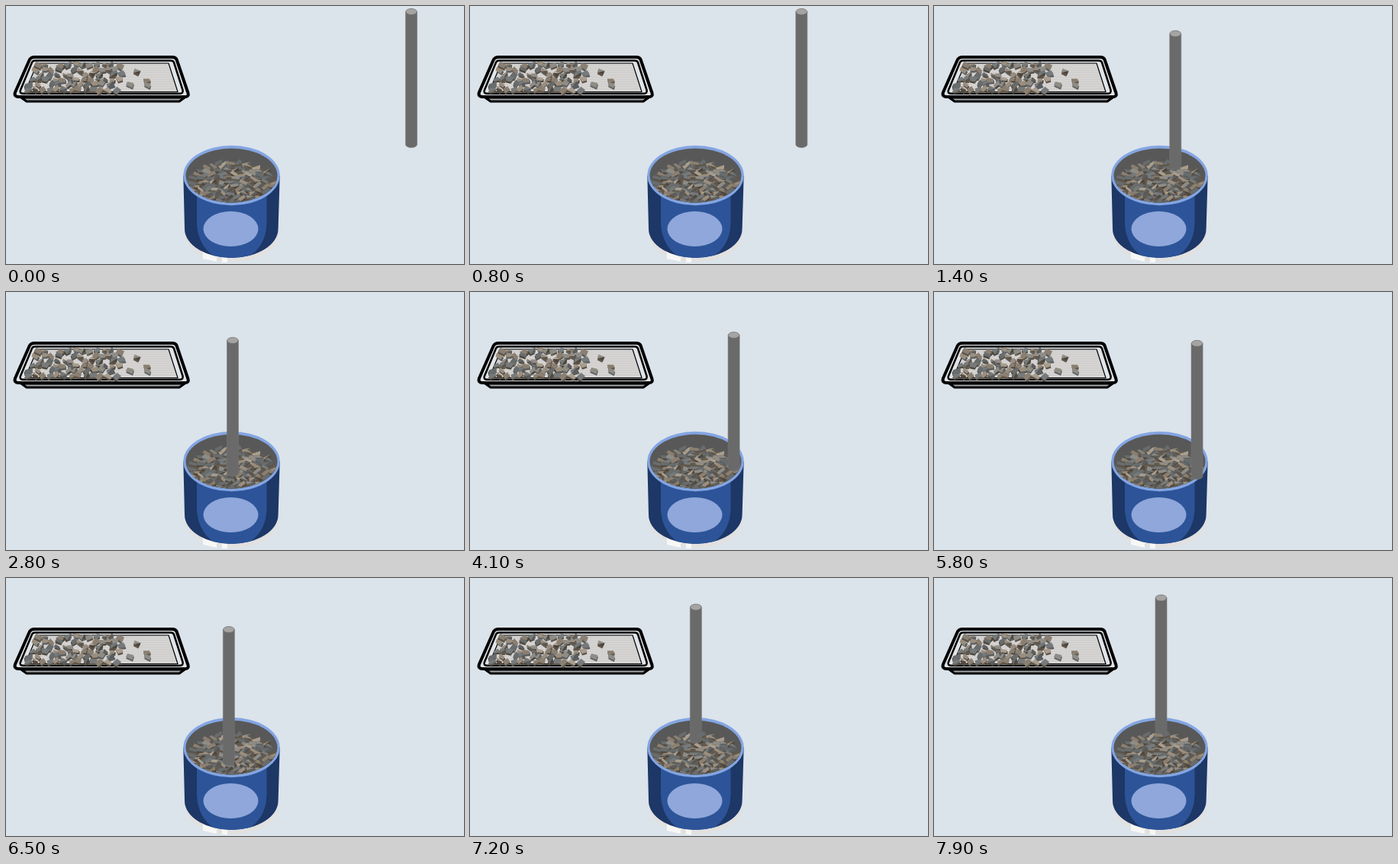
These frames come from a looping animation (600 by 338 pixels, 8000 ms). An HTML page:

```html
<!DOCTYPE html>
<html lang="en">
<head>
<meta charset="utf-8">
<title>Stirring a can of gravel</title>
<style>
  html, body { margin: 0; width: 100%; height: 100%; overflow: hidden; background: #dbe3eb; }
  svg { display: block; width: 600px; height: 338px; }
</style>
</head>
<body>
<svg viewBox="0 0 600 338">
  <defs>
    <clipPath id="mouth"><ellipse cx="295.5" cy="222" rx="60" ry="35.500"/></clipPath>
    <clipPath id="body"><path d="M232.300 222L234 292A61.300 38 0 0 0 356.600 292L358.700 222Z"/></clipPath>
    <pattern id="lines" width="4" height="3" patternUnits="userSpaceOnUse">
      <rect width="4" height="3" fill="#d6d4d3"/><rect width="4" height="1" fill="#cfcdcc"/>
    </pattern>
  </defs>

  <g stroke="#000" stroke-linejoin="round">
    <path d="M20 120L27 125H227L234 120Z" fill="#a5a8aa" stroke-width="3"/>
    <path d="M37 67H218Q222 67 223.500 70L238.500 114Q240 119 234 119H17Q10 119 12 113L31 70Q33 67 37 67Z" fill="#e0e4e8" stroke-width="4"/>
    <path d="M38 71.500H216Q219 71.500 220 74L231.500 110Q232.500 114.800 228 114.800H23Q17 114.800 19 110L34 74Q35 71.500 38 71.500Z" fill="#e0e4e8" stroke-width="2.500"/>
    <path d="M41 75H213L225 112.500H25Z" fill="url(#lines)" stroke-width="1.200"/>
  </g>
  <g id="tray"></g>

  <ellipse cx="296" cy="299" rx="61.500" ry="37" fill="#e1e1e1"/>
  <path d="M258 322V331L276 335V326ZM283 328V336H290V328Z" fill="#f8f7f5"/>
  <g clip-path="url(#body)">
    <rect x="230" y="220" width="130" height="112" fill="#1d3766"/>
    <path d="M250 222V285Q252 318 278 331H313Q340 318 341.500 285V222Z" fill="#2d5498"/>
  </g>
  <ellipse cx="294.500" cy="292" rx="36" ry="23" fill="#8fa7da"/>
  <ellipse cx="295.500" cy="222" rx="63.200" ry="39.200" fill="#83a5e2"/>
  <ellipse cx="295.500" cy="222" rx="60" ry="35.500" fill="#585858"/>
  <g id="can" clip-path="url(#mouth)">
    <ellipse cx="299" cy="236" rx="56" ry="30" fill="#625a50"/>
  </g>

  <g id="rod">
    <path d="M-7.500 4.500V178.500A7.500 4 0 0 0 7.500 178.500V4.500Z" fill="#6a6a6a" stroke="#767676" stroke-width=".6"/>
    <ellipse cy="4.500" rx="7.300" ry="4" fill="#a5a4a2" stroke="#6a6a6a" stroke-width=".7"/>
  </g>
</svg>
<script>
  const $ = id => document.getElementById(id);
  const tones = ['#9a8e7f', '#8a7f71', '#767a7b', '#8f8c86', '#a99d8d', '#686c6d'];
  const shades = ['#4e463c', '#5d5448', '#5a5d5e'];

  let seed = 41;
  const rnd = () => (seed = (seed * 16807) % 2147483647) / 2147483647;
  const jit = n => (rnd() * 2 - 1) * n;
  const pick = list => list[Math.floor(rnd() * list.length)];

  function poly(parent, pts, fill) {
    const p = document.createElementNS('http://www.w3.org/2000/svg', 'polygon');
    p.setAttribute('points', pts.map(q => q.map(v => v.toFixed(1)).join()).join(' '));
    p.setAttribute('fill', fill);
    parent.append(p);
  }

  // A tilted four-sided chip: dark side below, lighter face on top.
  function chip(parent, x, y, w, h) {
    const a = jit(0.75), c = Math.cos(a), s = Math.sin(a);
    const face = [[-1, -1], [1, -1], [1, 1], [-1, 1]].map(([i, j]) => {
      const u = i * w * (0.8 + jit(0.3)), v = j * h * (0.8 + jit(0.4));
      return [x + u * c - v * s, y + u * s + v * c];
    });
    const dx = jit(1.5);
    poly(parent, face.map(([px, py]) => [px + dx, py + 2.2]), pick(shades));
    poly(parent, face, pick(tones));
    if (rnd() < 0.4) poly(parent, face.slice(1), pick(shades));
  }

  for (let y = 77; y < 113; y += 6.4) {
    for (let x = 43 - (y - 77) * 0.42; x < 152; x += 9.5)
      if (rnd() < 0.88) chip($('tray'), x + jit(2.5), y + jit(1.5), 5.2, 3.5);
  }
  for (const [x, y] of [[171, 86], [162, 103], [183, 97], [185, 103]])
    chip($('tray'), x, y, 5, 3.5);

  for (let y = 206; y < 262; y += 5) {
    const half = 54 * Math.sqrt(1 - ((y - 235) / 32) ** 2);
    for (let x = 299 - half; x <= 299 + half; x += 9.5)
      chip($('can'), x + jit(3), y + jit(1.5), 6.5, 2.6);
  }

  const mix = (a, b, u) => a + (b - a) * u;
  const ease = (t, from, to) => {
    const u = Math.min(1, Math.max(0, (t - from) / (to - from)));
    return (1 - Math.cos(u * Math.PI)) / 2;
  };

  // Stirring runs round one ellipse: time in ms, angle, relative radius.
  const stir = [
    [1800, 3.66, 0.95], [2000, 0.59, 0.95], [2100, 0.59, 0.95], [2800, -3.07, 0.83],
    [3900, -5.32, 0.72], [4100, -6.79, 0.97], [5100, -15.12, 0.64], [6500, -22.17, 1.02]
  ];

  function stirAt(t) {
    const i = stir.findIndex(s => s[0] >= t) || 1;
    const [a, b] = [stir[i - 1], stir[i]], u = (t - a[0]) / (b[0] - a[0]);
    const turn = mix(a[1], b[1], u), r = mix(a[2], b[2], u);
    return [321 + 29 * r * Math.cos(turn), 60 + 17 * r * Math.sin(turn)];
  }

  function pose(t) {
    if (t < 1800) return [mix(531, 297, ease(t, 80, 1700)), mix(3, 52, ease(t, 900, 1800))];
    if (t <= 6500) return stirAt(t);
    const u = ease(t, 6500, 7600);
    return [mix(292, 297.5, u), mix(63, 21.6, u)];
  }

  const rod = $('rod'), step = 100, loop = 8000;
  const start = performance.now();
  function draw(now) {
    const t = Math.floor((Math.max(0, now - start) % loop) / step) * step;
    rod.setAttribute('transform', `translate(${pose(t).map(v => v.toFixed(2))})`);
    requestAnimationFrame(draw);
  }
  draw(start);
</script>
</body>
</html>
```
